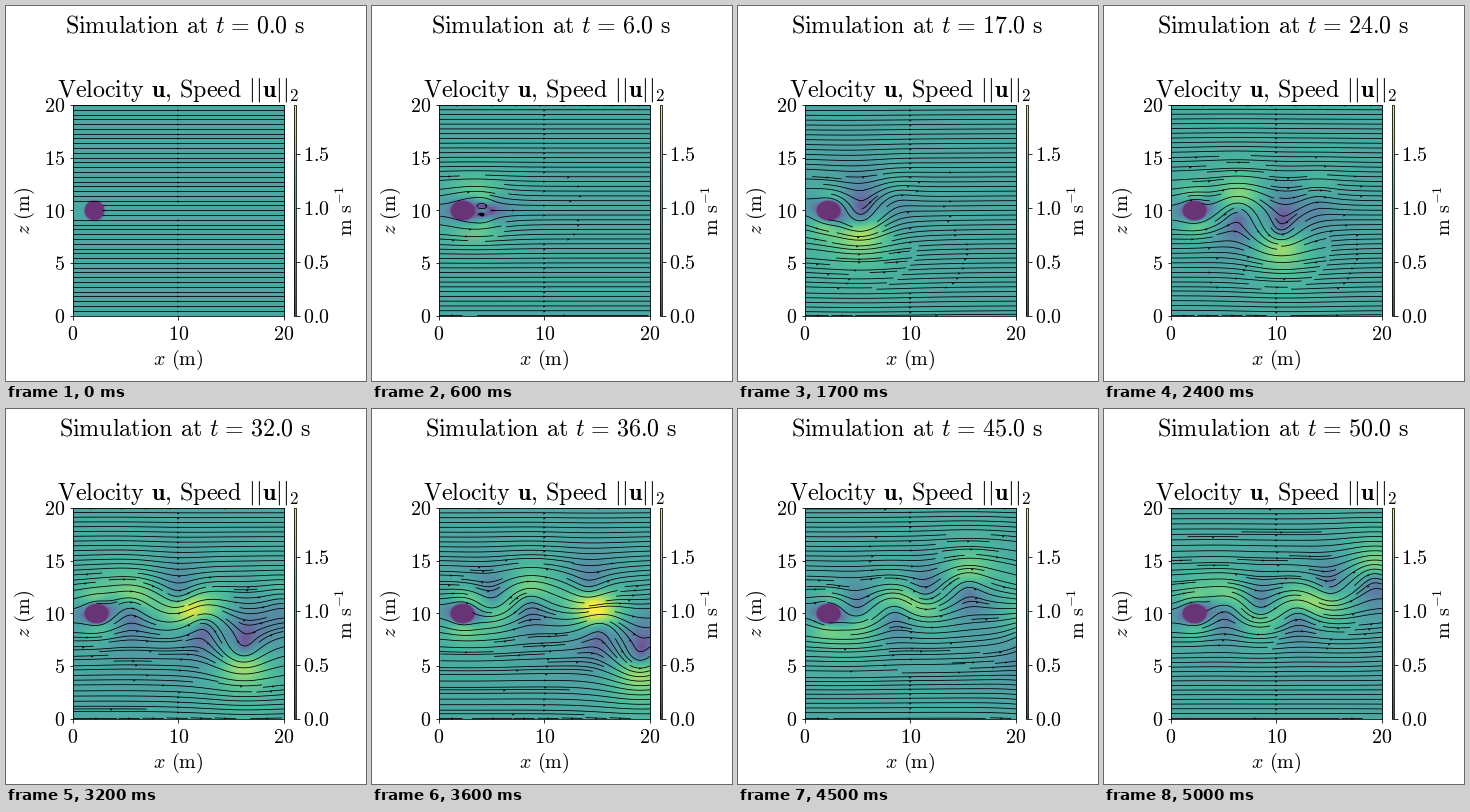
Recreate the animation shown at these times as a matplotlib script. Size 360 px wide and 375 px high, loop 5100 ms.

```python
import numpy as np
import matplotlib.pyplot as plt
from matplotlib.animation import FuncAnimation
from matplotlib.collections import LineCollection

W, H, DPI = 360, 375, 72
SIZE = 20.0           # domain edge in metres
N = 301               # field nodes per side
CELLS = 45            # streamline spacing mask
STEP, STEPS = 0.2, 130
VMAX = 1.955
DISC = 2 + 10j

plt.rcParams.update({"mathtext.fontset": "cm", "font.size": 20})

axis = np.linspace(0, SIZE, N)
X, Y = np.meshgrid(axis, axis)
ETA = Y - DISC.imag

# shed time, spin (1 = clockwise), speed, height, climb rate, strength, core
VORTICES = [
    (12.5, 1, 0.74, 11.2, 0.00, 0.7, 2.2),
    (17.0, -1, 0.72, 9.1, -0.19, 2.6, 2.5),
    (22.5, 1, 0.74, 10.2, -0.10, 2.4, 2.5),
    (27.5, -1, 1.05, 10.6, 0.16, 1.9, 2.4),
    (31.7, 1, 0.76, 10.6, 0.165, 1.8, 2.4),
    (36.6, -1, 0.73, 11.0, 0.075, 1.7, 2.3),
    (40.4, 1, 0.70, 10.7, -0.05, 1.7, 2.3),
    (45.8, -1, 0.74, 10.0, 0.07, 1.7, 2.3),
    (50.0, 1, 0.74, 10.6, 0.00, 1.7, 2.3),
    (55.0, -1, 0.74, 10.0, 0.00, 1.7, 2.3),
]


def smooth(v):
    v = min(max(v, 0), 1)
    return v * v * (3 - 2 * v)


def mix(a, b, k):
    return a + (b - a) * k


def vortex_psi(t, x, y):
    """Stream function of all shed vortices at time t."""
    psi = np.zeros_like(x)
    for shed, spin, speed, height, climb, power, core in VORTICES:
        age = t - shed
        gain = power * smooth((age + 5) / 5)
        if gain == 0:
            continue
        cx = 5.3 + age * (speed if age > 0 else 0.4)
        cy = height + climb * max(age, 0)
        psi -= spin * gain / (1 + ((x - cx) ** 2 + (y - cy) ** 2) / core ** 2)
    return psi


def velocity(t):
    grow, late = min(t / 6, 1), smooth((t - 9) / 7)
    cx = mix(2 + 1.4 * grow, 2.3, late)
    rx = mix(1.2 + 1.2 * grow, 1.5, late)
    ry = mix(1 + 0.6 * grow, 1.3, late)
    rho = ((X - cx) / rx) ** 2 + (ETA / ry) ** 2
    block = 1 - min(t, 1) * (1 + rho / 4) ** -4

    at_disc = vortex_psi(t, np.array([DISC.real]), np.array([DISC.imag]))[0]
    psi = (ETA + vortex_psi(t, X, Y) - at_disc) * block
    back = 0.8 * smooth((t - 1) / 4) * (1 - late)
    psi -= back * ETA * np.exp(-((X - 4.2) / 0.8) ** 2 - (ETA / 0.8) ** 2)

    dy, dx = np.gradient(psi, axis[1])
    tail = 0.2 * min(t / 4, 1)
    r = np.hypot((X - DISC.real - tail) / (1 + tail), ETA)
    return (dy - 1j * dx) * np.clip((r - 0.9) / 0.15, 0, 1)


def spiral(n):
    """Mask cells from the border inwards, ring by ring."""
    for k in range((n + 1) // 2):
        e = n - 1 - k
        yield from ((i, k) for i in range(k, e + 1))
        yield from ((e, j) for j in range(k + 1, e + 1))
        yield from ((i, e) for i in range(e - 1, k - 1, -1))
        yield from ((k, j) for j in range(e - 1, k, -1))


SEED_CELLS = list(spiral(CELLS))
SEEDS = np.array([complex(i, j) for i, j in SEED_CELLS]) * SIZE / (CELLS - 1)


def trace(flow):
    """Follow the flow from every seed, forwards and backwards at once."""
    mag = np.abs(flow)
    heading = np.where(mag > 1e-3, flow / np.maximum(mag, 1e-3), 0).ravel()
    count = len(SEEDS)
    hop = STEP * np.repeat([1, -1], count)
    scale = (N - 1) / SIZE

    def look(z):
        ix = np.clip(z.real * scale + 0.5, 0, N - 1).astype(int)
        iy = np.clip(z.imag * scale + 0.5, 0, N - 1).astype(int)
        return heading[iy * N + ix]

    path = np.empty((STEPS + 1, 2 * count), complex)
    path[0] = np.tile(SEEDS, 2)
    for s in range(STEPS):
        z = path[s]
        path[s + 1] = z + hop * look(z + hop / 2 * look(z))
    return path


def streamlines(flow):
    path = trace(flow)
    k = (CELLS - 1) / SIZE
    ci = np.floor(path.real * k + 0.5).astype(int)
    cj = np.floor(path.imag * k + 0.5).astype(int)
    inside = ((path.real >= 0) & (path.real <= SIZE)
              & (path.imag >= 0) & (path.imag <= SIZE))
    moving = np.ones_like(inside)
    moving[1:] = np.abs(np.diff(path, axis=0)) > STEP / 10
    codes = np.where(inside & moving, cj * CELLS + ci, -1).T
    count = len(SEEDS)
    taken, lines, tips = set(), [], []

    for n, (i, j) in enumerate(SEED_CELLS):
        home = j * CELLS + i
        if home in taken:
            continue
        mine, ends = {home}, []
        for col in (n, n + count):
            last, end = home, 1
            for code in codes[col, 1:].tolist():
                if code < 0:
                    break
                if code != last:
                    if code in taken or code in mine:
                        break
                    mine.add(code)
                    last = code
                end += 1
            ends.append(end)
        if (sum(ends) - 2) * STEP < 0.1 * SIZE:
            continue
        taken |= mine
        line = np.concatenate([path[1:ends[1], n + count][::-1],
                               path[:ends[0], n]])
        lines.append(np.column_stack([line.real, line.imag]))
        if abs(line[0] - DISC) > 1.4:
            tips.append(line[len(line) // 2])
    return lines, np.array(tips)


def px_axes(x0, y0, x1, y1):
    return fig.add_axes([x0 / W, 1 - y1 / H, (x1 - x0) / W, (y1 - y0) / H])


def label(x, y, text, size=20, **kw):
    kw = {"ha": "center", "va": "baseline", **kw}
    return fig.text(x / W, 1 - y / H, text, fontsize=size, **kw)


SP = r"\hspace{0.38}"
EQ = r"\hspace{0.116}=\hspace{0.116}"


def heading_text(t):
    return (rf"$\mathrm{{Simulation}}{SP}\mathrm{{at}}{SP}t{EQ}"
            rf"{t:.1f}{SP}\mathrm{{s}}$")


fig = plt.figure(figsize=(W / DPI, H / DPI), dpi=DPI, facecolor="white")
ax = px_axes(66.5, 99, 278, 309.5)
image = ax.imshow(np.ones((N, N)), origin="lower", extent=(0, SIZE, 0, SIZE),
                  cmap="viridis", vmin=0, vmax=VMAX, alpha=0.8,
                  interpolation="bilinear", aspect="auto")
flow_lines = LineCollection([], colors="black", linewidths=0.8)
ax.add_collection(flow_lines)
arrows, = ax.plot([], [], ">", color="black", ms=2.2, mew=0)
ax.set(xlim=(0, SIZE), ylim=(0, SIZE))
ax.set_xticks([0, 10, 20], ["$0$", "$10$", "$20$"])
ax.set_yticks([0, 5, 10, 15, 20], ["$0$", "$5$", "$10$", "$15$", "$20$"])
ax.tick_params(axis="x", pad=5.5)

bar_ax = px_axes(287.5, 99, 290, 309.5)
bar = fig.colorbar(image, cax=bar_ax)
bar.set_ticks([0, 0.5, 1, 1.5], labels=["$0.0$", "$0.5$", "$1.0$", "$1.5$"])

title = label(179.5, 26.5, heading_text(0), 24)
label(172.5, 91, rf"$\mathrm{{Velocity}}{SP}\mathbf{{u}}\mathrm{{,}}{SP}"
      rf"\mathrm{{Speed}}{SP}||\mathbf{{u}}||_2$", 24)
label(172, 359, rf"$x{SP}\mathrm{{(m)}}$")
label(19, 204.5, rf"$z{SP}\mathrm{{(m)}}$", rotation=90, va="center")
label(340, 204.5, rf"$\mathrm{{m}}{SP}\mathrm{{s}}^{{-1}}$",
      rotation=90, va="center")


def update(t):
    flow = velocity(t)
    lines, tips = streamlines(flow)
    image.set_data(np.abs(flow))
    flow_lines.set_segments(lines)
    arrows.set_data(tips.real, tips.imag)
    title.set_text(heading_text(t))
    return image, flow_lines, arrows, title


anim = FuncAnimation(fig, update, frames=51, interval=100, repeat=True,
                     repeat_delay=0, blit=False)
plt.show()
```
